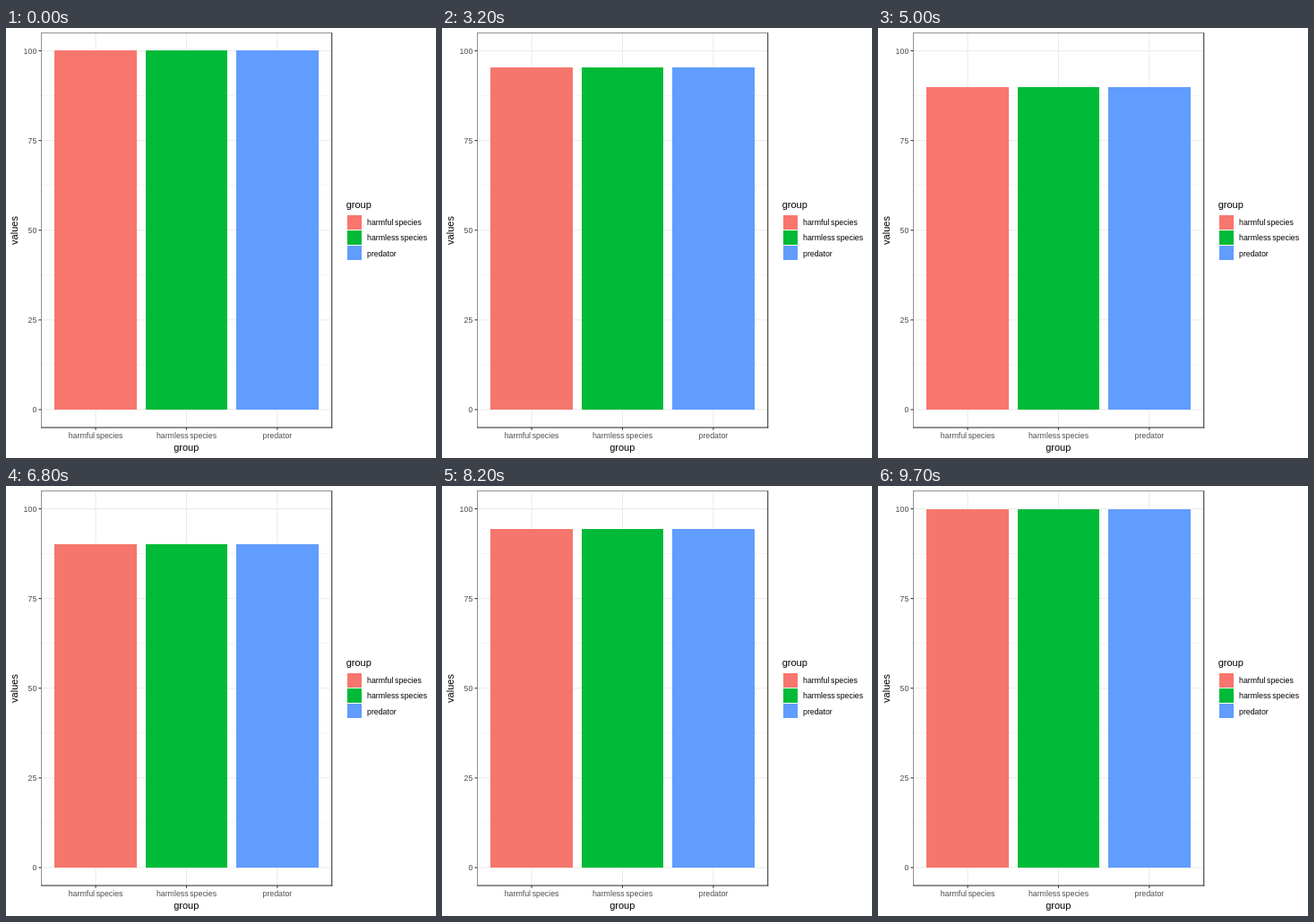
Animation of 480x480 px, one loop 10000 ms. Source, as an HTML page:

```html
<!DOCTYPE html>
<html lang="en">
<head>
<meta charset="utf-8">
<title>Bar chart</title>
<style>
  html, body { margin: 0; width: 100%; height: 100%; overflow: hidden; background: #fff; }
  svg { display: block; width: 480px; height: 480px; }
  text { font: 8.8px "Liberation Sans", Arial, sans-serif; word-spacing: -0.8px; }
  .title { font-size: 11px; }
  .axis { fill: #4d4d4d; }
</style>
</head>
<body>
<svg id="chart" viewBox="0 0 480 480"></svg>
<script>
const chart = document.getElementById('chart');

const LEFT = 39.25, UNIT = 101.4, RIGHT = LEFT + 3.2 * UNIT;
const Y100 = 25.48, SPAN = 400.5, TOP = Y100 - SPAN / 20, BOTTOM = Y100 + SPAN * 1.05;
const LINE = 1.07, DARK = '#333', GRID = '#ebebeb';

const groups = [
  { name: 'harmful species', fill: '#f8766d', moving: '#f5766c' },
  { name: 'harmless species', fill: '#00ba38' },
  { name: 'predator', fill: '#619cff' }
];

const yOf = value => Y100 + (100 - value) / 100 * SPAN;
const xOf = slot => LEFT + (slot + 0.6) * UNIT;

function add(tag, attrs, content = '') {
  const el = document.createElementNS('http://www.w3.org/2000/svg', tag);
  for (const key in attrs) el.setAttribute(key, attrs[key]);
  el.textContent = content;
  return chart.appendChild(el);
}
const box = (x, y, width, height, fill) => add('rect', { x, y, width, height, fill });
const across = (x1, x2, y, w, fill) => box(x1, y - w / 2, x2 - x1, w, fill);
const down = (x, y1, y2, w, fill) => box(x - w / 2, y1, w, y2 - y1, fill);
const label = (x, y, content, anchor, cls = '', more = {}) =>
  add('text', { x, y, 'text-anchor': anchor, class: cls, ...more }, content);

// Grid
for (let v = 12.5; v < 100; v += 25) across(LEFT, RIGHT, yOf(v), LINE / 2, GRID);
for (let v = 0; v <= 100; v += 25) across(LEFT, RIGHT, yOf(v), LINE, GRID);
groups.forEach((g, i) => down(xOf(i), TOP, BOTTOM, LINE, GRID));

// Bars sit on whole pixels
const BASE = Math.round(yOf(0));
const bars = groups.map((g, i) => {
  const x = Math.round(xOf(i) - 0.45 * UNIT);
  return box(x, 0, Math.round(xOf(i) + 0.45 * UNIT) - x, 0, g.fill);
});

// Panel border: left and top sides show only their inner half
const half = LINE / 2;
box(LEFT, TOP, half, BOTTOM - TOP + half, DARK);
box(LEFT, TOP, RIGHT - LEFT + half, half, DARK);
down(RIGHT, TOP, BOTTOM + half, LINE, DARK);
across(LEFT, RIGHT + half, BOTTOM, LINE, DARK);

// Axes
for (let v = 0; v <= 100; v += 25) {
  across(LEFT - 2.74, LEFT, yOf(v), LINE, DARK);
  label(34.3, yOf(v) + 3.1, v, 'end', 'axis');
}
groups.forEach((g, i) => {
  down(xOf(i), BOTTOM, BOTTOM + 2.74, LINE, DARK);
  label(xOf(i), 458, g.name, 'middle', 'axis');
});
label(201.3, 472, 'group', 'middle', 'title');
label(0, 0, 'values', 'middle', 'title', { transform: 'translate(13 226) rotate(-90)' });

// Legend
label(379.7, 201, 'group', 'start', 'title');
groups.forEach((g, i) => {
  box(381, 209 + 17 * i, 16, 16, g.fill);
  label(403, 220.1 + 17.28 * i, g.name, 'start');
});

const ease = p => (1 - Math.cos(Math.PI * Math.min(1, Math.max(0, p)))) / 2;

function draw(now) {
  const t = Math.floor(now % 10000 / 100) * 100;
  const drop = ease((t - 1600) / 3400) - ease((t - 6700) / 3300);
  const top = Math.round(yOf(100 - 10 * drop));
  const moving = drop > 0 && drop < 1;
  bars.forEach((bar, i) => {
    bar.setAttribute('y', top);
    bar.setAttribute('height', BASE - top);
    bar.setAttribute('fill', moving && groups[i].moving || groups[i].fill);
  });
}

const start = performance.now();
(function tick() {
  draw(performance.now() - start);
  requestAnimationFrame(tick);
})();
</script>
</body>
</html>
```
